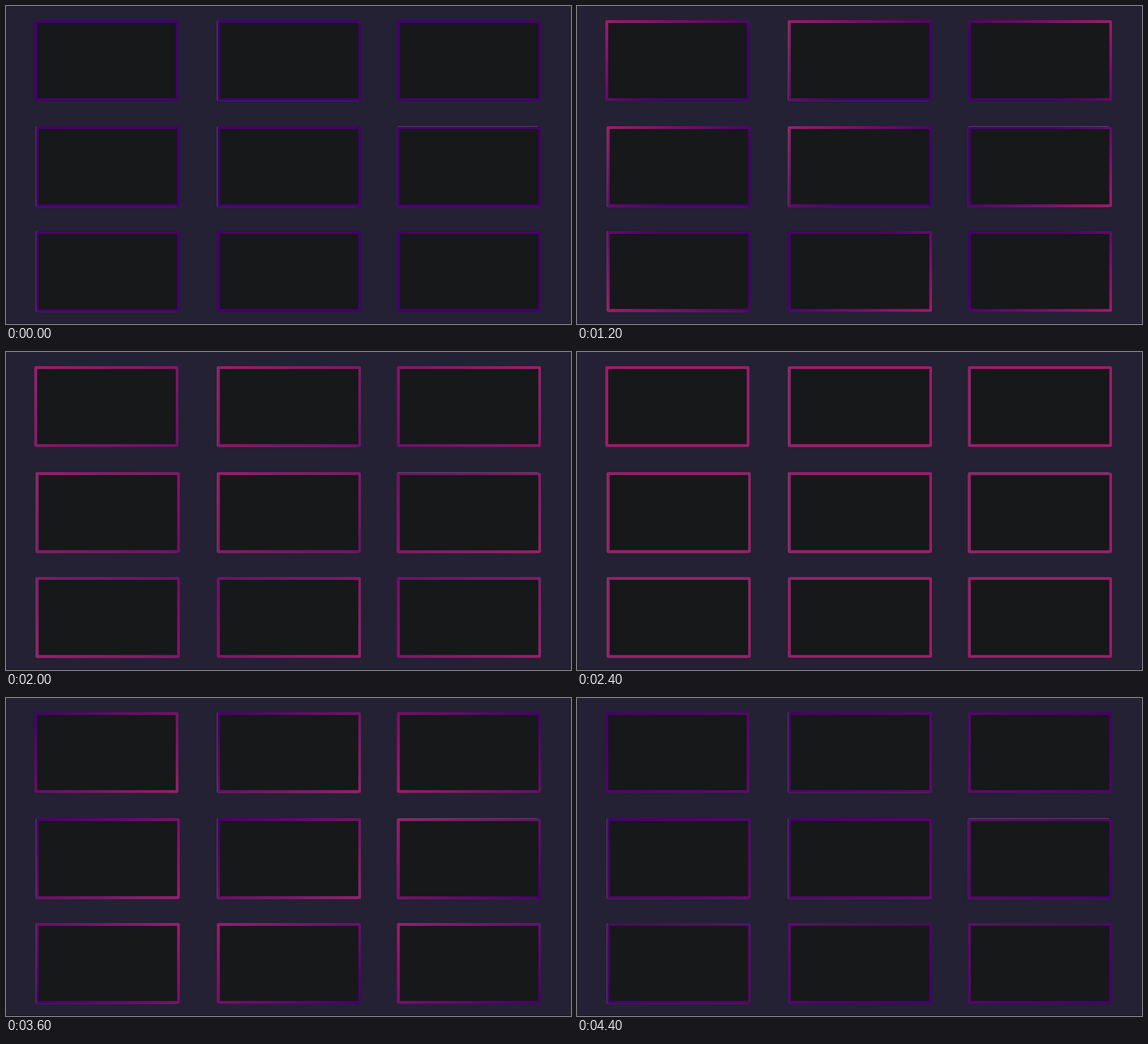
An HTML page that plays this animation: 998 px wide and 561 px high, repeating every 4800 ms.

```html
<!DOCTYPE html>
<html lang="en">
<head>
<meta charset="utf-8">
<title>Glowing frames</title>
<style>
  html, body { margin: 0; width: 100%; height: 100%; overflow: hidden; background: #232133; }
  svg { display: block; width: 100%; height: 100%; }
</style>
</head>
<body>
<svg id="stage" viewBox="0 0 998 561" preserveAspectRatio="none">
  <rect width="998" height="561" fill="#232133"/>
  <rect y="560" width="998" height="1" fill="#15151c"/>
</svg>
<script>
const NS = 'http://www.w3.org/2000/svg';
const stage = document.getElementById('stage');
const PURPLE = [69, 0, 105], PINK = [152, 31, 107];
const W = 254.5, H = 142.5, STEP = 400, HALF = 2400;

// left, top, corner the colour starts from, side with a thin grey edge
const boxes = [
  [50, 25, 'TL', ''], [372.5, 25, 'TL', 'L'], [690.5, 25, 'TR', ''],
  [52.5, 212, 'TL', 'L'], [372.5, 212, 'TL', 'L'], [690.5, 212.3, 'BR', 'T'],
  [52.5, 397, 'BL', 'L'], [372.5, 397, 'BR', ''], [690.5, 397, 'BR', '']
];

function add(parent, tag, attrs) {
  const el = document.createElementNS(NS, tag);
  for (const key in attrs) el.setAttribute(key, attrs[key]);
  return parent.appendChild(el);
}

function addRect(x, y, width, height, fill, rx = 0) {
  return add(stage, 'rect', { x, y, width, height, fill, rx });
}

// Diagonal axis: the wide side covers 57% of the ramp, the short side 43%
const nx = 0.57 / W, ny = 0.43 / H, norm = nx * nx + ny * ny;
const dx = nx / norm, dy = ny / norm;

const stops = boxes.map(([x, y, corner, edge], i) => {
  const right = corner[1] === 'R', bottom = corner[0] === 'B';
  const x1 = x + (right ? W : 0), y1 = y + (bottom ? H : 0);
  const grad = add(stage, 'linearGradient', {
    id: 'g' + i, gradientUnits: 'userSpaceOnUse', x1, y1,
    x2: x1 + (right ? -dx : dx), y2: y1 + (bottom ? -dy : dy)
  });
  const near = add(grad, 'stop', { offset: 0 });
  const far = add(grad, 'stop', { offset: 1 });
  const left = edge === 'L' ? 0.8 : 0, top = edge === 'T' ? 0.8 : 0;
  if (edge) addRect(x, y, W - 4, H, '#666768', 3);
  addRect(x + left, y + top, W - left, H - top, `url(#g${i})`, 3);
  addRect(x + 5.2, y + 5, 244.6, 132.5, '#16181a');
  return [near, far];
});

const rgb = c => `rgb(${c.map(Math.round)})`;
const mix = (a, b, k) => a.map((v, i) => v + (b[i] - v) * k);

function draw(ms) {
  const t = Math.floor((ms % (2 * HALF)) / STEP) * STEP;
  const second = t >= HALF;
  const [from, to] = second ? [PINK, PURPLE] : [PURPLE, PINK];
  const spread = second ? 1200 : 1600;
  const local = t % HALF;
  // The new colour spreads from the corner, then the far end catches up
  const reach = Math.min(1, local / spread) ** 1.5;
  const fade = Math.max(0, (local - spread) / (HALF - spread));
  const start = rgb(local ? to : from);
  const end = rgb(mix(from, to, fade));
  for (const [near, far] of stops) {
    near.setAttribute('stop-color', start);
    far.setAttribute('stop-color', end);
    far.setAttribute('offset', reach);
  }
}

const began = performance.now();
function tick() {
  draw(performance.now() - began);
  requestAnimationFrame(tick);
}
tick();
</script>
</body>
</html>
```
